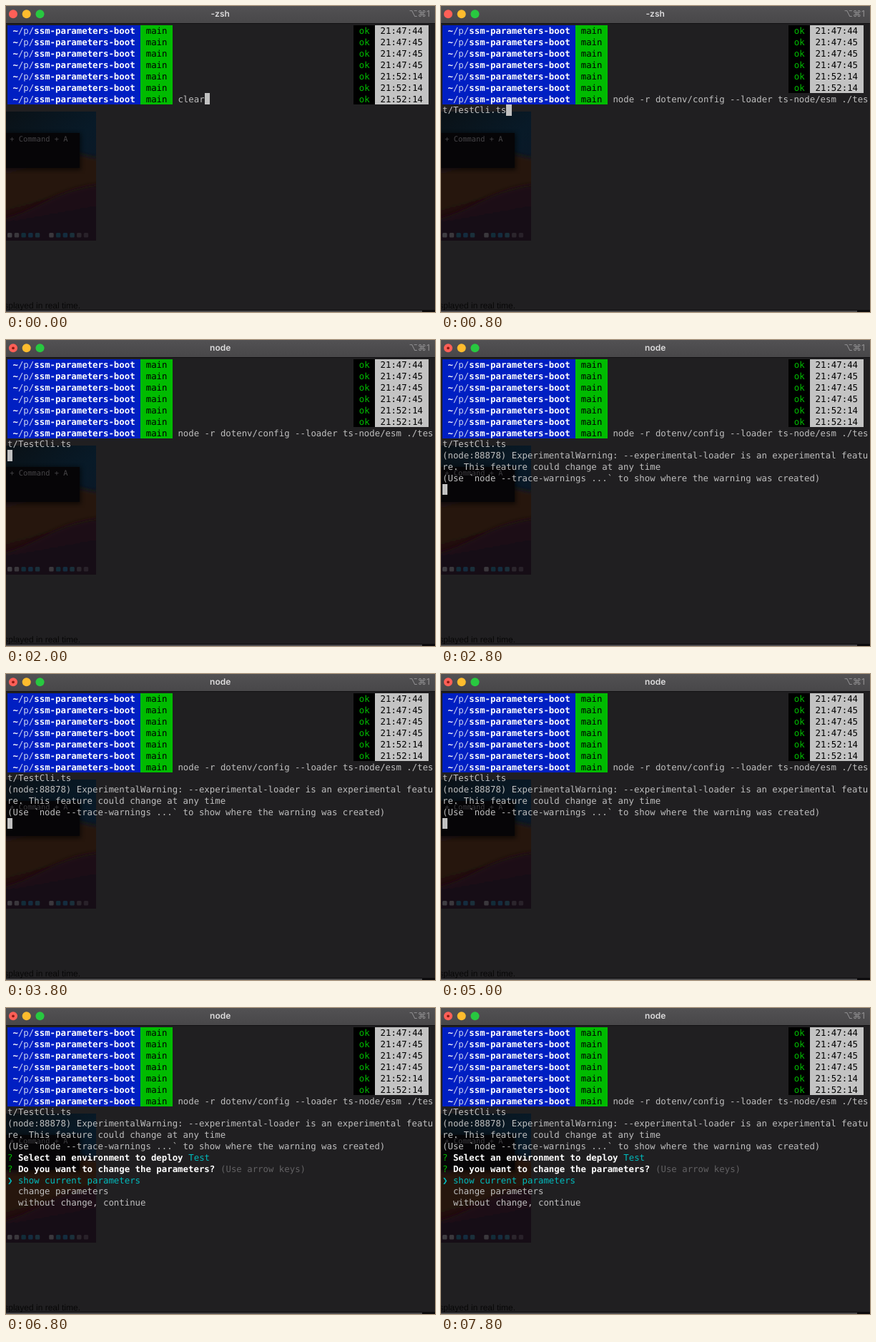
Write an HTML page that moves like this. It is 600 px wide and 429 px high and loops after 8 s.

```html
<!DOCTYPE html>
<html lang="en">
<head>
<meta charset="utf-8">
<title>Terminal</title>
<style>
  html, body { margin: 0; width: 100%; height: 100%; overflow: hidden; background: #201f21; }
  svg { display: block; width: 100%; height: 100%; }
  text { white-space: pre; text-rendering: geometricPrecision; }
  .mono { font: 12.375px "DejaVu Sans Mono", monospace; }
  .bold { font-weight: 700; }
  .title { font: 600 12px Inter, sans-serif; fill: #dddcdd; text-anchor: middle; }
</style>
</head>
<body>
<svg viewBox="0 0 600 429">
  <defs>
    <linearGradient id="bar" x2="0" y2="1">
      <stop stop-color="#525153"/><stop offset="1" stop-color="#484749"/>
    </linearGradient>
    <linearGradient id="sky" x2=".6" y2="1">
      <stop stop-color="#0a1116"/><stop offset=".5" stop-color="#081a28"/><stop offset="1" stop-color="#0c1626"/>
    </linearGradient>
    <linearGradient id="glow" x2=".3" y2="1">
      <stop stop-color="#231b16"/><stop offset=".35" stop-color="#28150f"/><stop offset="1" stop-color="#1d0b10"/>
    </linearGradient>
    <linearGradient id="dusk" x2=".3" y2="1">
      <stop stop-color="#220f14"/><stop offset="1" stop-color="#130b15"/>
    </linearGradient>
    <clipPath id="photo"><rect y="148" width="126" height="181"/></clipPath>
    <filter id="soft"><feGaussianBlur stdDeviation="3"/></filter>
  </defs>

  <rect width="600" height="429" fill="#201f21"/>
  <rect y="426" width="600" height="3" fill="#0c0b0d"/>
  <rect y="427" width="582" height="2" fill="#4b4a4c"/>
  <text x="104" y="423.5" text-anchor="end" font-family="Liberation Sans, sans-serif" font-size="12" fill="#080808">displayed in real time.</text>

  <g clip-path="url(#photo)">
    <rect y="148" width="126" height="181" fill="url(#sky)"/>
    <path d="M-10 205H85C100 205 112 212 136 214V340H-10Z" fill="url(#glow)" filter="url(#soft)"/>
    <path d="M-10 300C40 290 70 255 136 250V340H-10Z" fill="url(#dusk)" filter="url(#soft)"/>
    <rect x="-10" y="178" width="115" height="52" fill="#050406" opacity=".6" filter="url(#soft)"/>
    <rect y="178" width="103" height="49" fill="#060507"/>
    <g id="dock"></g>
  </g>
  <text id="caption" x="86.5" y="189.5" text-anchor="end" font-family="DejaVu Sans Mono, monospace" font-size="10.4">Option + Command + A</text>

  <rect width="600" height="24" fill="url(#bar)"/>
  <rect y="24" width="600" height="1" fill="#111012"/>
  <circle cx="10" cy="11.3" r="6" fill="#fe5f57"/>
  <circle cx="28.7" cy="11.3" r="6" fill="#febc2e"/>
  <circle cx="47.5" cy="11.3" r="6" fill="#28c840"/>
  <text x="593" y="14.5" text-anchor="end" font-family="Inter, DejaVu Sans, sans-serif" font-size="12.2" fill="#929193">⌥⌘1</text>
  <g id="screen"></g>
</svg>
<script>
const LOOP = 8000, COL = 7.45, ROW = 15.87, LEFT = 2, TOP = 27;
const TYPED = 400, ENTER = 2000, WARNED = 2200, ASKED = 5400, CHOSEN = 6800;
const C = { grey: '#bfbfbf', white: '#fff', blue: '#001fc2', green: '#00bb00',
            cyan: '#00bcbe', dim: '#626163', black: '#000' };

const screen = document.getElementById('screen');
const caption = document.getElementById('caption');

function add(parent, tag, attrs, content = '') {
  const el = document.createElementNS('http://www.w3.org/2000/svg', tag);
  for (const key in attrs) el.setAttribute(key, attrs[key]);
  el.textContent = content;
  parent.append(el);
  return el;
}

function block(g, row, col, cols, fill) {
  add(g, 'rect', { x: LEFT + col * COL, y: TOP + row * ROW, width: cols * COL, height: ROW,
                   fill, 'shape-rendering': 'crispEdges' });
}

function print(g, row, col, content, fill = C.grey, bold = false) {
  add(g, 'text', { x: LEFT + col * COL, y: TOP + row * ROW + 12.3, fill,
                   class: bold ? 'mono bold' : 'mono' }, content);
}

const cursor = (g, row, col) => block(g, row, col, 1, '#c1c1c1');

function prompt(g, row) {
  block(g, row, 0, 25, C.blue);
  block(g, row, 25, 6, C.green);
  print(g, row, 1, '~', C.white, true);
  print(g, row, 2, '/p/', '#cbd2f2');
  print(g, row, 5, 'ssm-parameters-boot', C.white, true);
  print(g, row, 26, 'main', C.black);
}

function status(g, row, time) {
  block(g, row, 65, 4, C.black);
  block(g, row, 69, 10, '#c3c3c3');
  print(g, row, 66, 'ok', C.green);
  print(g, row, 70, time, C.black);
}

function question(g, row, label, tail, fill) {
  print(g, row, 0, '?', C.green);
  print(g, row, 2, label, C.white, true);
  print(g, row, 3 + label.length, tail, fill);
}

function menu(g, row, items) {
  print(g, row, 0, '❯', C.cyan);
  items.forEach((item, i) => print(g, row + i, 2, item, i ? C.grey : C.cyan));
}

const title = (g, name) => add(g, 'text', { x: 299.7, y: 15.3, class: 'title' }, name);

// Each scene part is visible from start until end.
const parts = [
  [0, LOOP, g => {
    ['21:47:44', '21:47:45', '21:47:45', '21:47:45', '21:52:14', '21:52:14']
      .forEach((time, row) => { prompt(g, row); status(g, row, time); });
    prompt(g, 6);
  }],
  [0, ENTER, g => title(g, '-zsh')],
  [ENTER, LOOP, g => {
    title(g, 'node');
    add(g, 'circle', { cx: 10, cy: 11.3, r: 1.9, fill: '#8c1a12' });
  }],
  [0, TYPED, g => {
    status(g, 6, '21:52:14');
    print(g, 6, 32, 'clear');
    cursor(g, 6, 37);
  }],
  [TYPED, LOOP, g => {
    print(g, 6, 32, 'node -r dotenv/config --loader ts-node/esm ./tes');
    print(g, 7, 0, 't/TestCli.ts');
  }],
  [TYPED, ENTER, g => cursor(g, 7, 12)],
  [ENTER, WARNED, g => cursor(g, 8, 0)],
  [WARNED, LOOP, g => {
    print(g, 8, 0, '(node:88878) ExperimentalWarning: --experimental-loader is an experimental featu');
    print(g, 9, 0, 're. This feature could change at any time');
    print(g, 10, 0, '(Use `node --trace-warnings ...` to show where the warning was created)');
  }],
  [WARNED, ASKED, g => cursor(g, 11, 0)],
  [ASKED, CHOSEN, g => {
    question(g, 11, 'Select an environment to deploy', '(Use arrow keys)', C.dim);
    menu(g, 12, ['Test', '- create a new environment -']);
  }],
  [CHOSEN, LOOP, g => {
    question(g, 11, 'Select an environment to deploy', 'Test', C.cyan);
    question(g, 12, 'Do you want to change the parameters?', '(Use arrow keys)', C.dim);
    menu(g, 13, ['show current parameters', 'change parameters', 'without change, continue']);
  }]
].map(([start, end, draw]) => {
  const g = add(screen, 'g', {});
  draw(g);
  return { start, end, g };
});

const dock = document.getElementById('dock');
const tints = ['#4a4a4e', '#444246', '#123442', '#14344a', '#1c3844'];
for (let i = 0; i < 12; i++) {
  if (i === 5) continue;
  add(dock, 'rect', { x: 2 + i * 9.7, y: 318, width: 6.5, height: 6.5, rx: 1.5,
                      fill: tints[i % 5], opacity: i > 9 ? .4 : .8 });
}

function render(now) {
  const t = now % LOOP;
  for (const { start, end, g } of parts) {
    g.setAttribute('visibility', t >= start && t < end ? 'visible' : 'hidden');
  }
  caption.setAttribute('fill', t < WARNED ? '#464548' : '#39383b');
}

const began = performance.now();
function tick() {
  render(performance.now() - began);
  requestAnimationFrame(tick);
}
tick();
</script>
</body>
</html>
```
